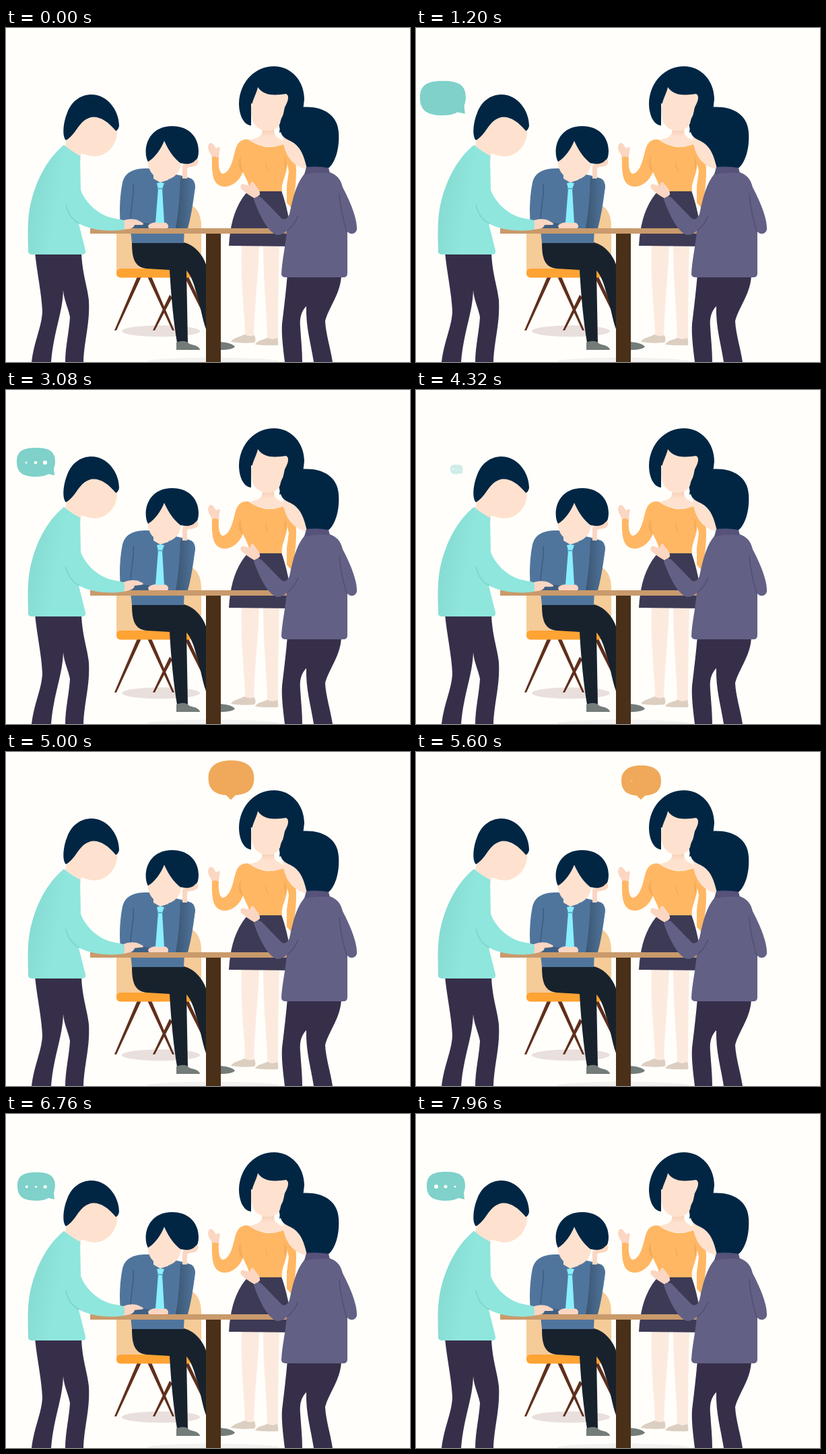
These frames come from a looping animation (600x497 px, 8000 ms). An HTML page:

```html
<!DOCTYPE html>
<html lang="en">
<head>
<meta charset="utf-8">
<title>Team discussion</title>
<style>
  html, body { margin: 0; width: 100%; height: 100%; overflow: hidden; background: #fffefa; }
  svg { display: block; width: 100%; height: 100%; }
  .skin { fill: #fee2cf; }
  .palm { fill: #fbd6c2; }
  .hair { fill: #012644; }
  .pants { fill: #372f4a; }
  .dot { fill: #fffefa; }
</style>
</head>
<body>
<svg viewBox="0 0 600 497">
  <defs>
    <linearGradient id="mint" x1="0" x2="1" y1=".3" y2=".5">
      <stop offset="0" stop-color="#84d9d0"/><stop offset=".35" stop-color="#8fe6dd"/>
    </linearGradient>
    <linearGradient id="sleeve">
      <stop offset="0" stop-color="#3b5672"/><stop offset="1" stop-color="#50759d"/>
    </linearGradient>
    <linearGradient id="neck" x2="0" y2="1">
      <stop offset="0" stop-color="#f6cdb5"/><stop offset="1" stop-color="#fee2cf"/>
    </linearGradient>
  </defs>

  <ellipse cx="230" cy="451" rx="58" ry="8.5" fill="#e9dfdc"/>
  <ellipse cx="308" cy="496" rx="98" ry="5.5" fill="#f3f2f0"/>

  <g id="woman">
    <path fill="#fdeadf" d="M350 320H376C375 365 370 400 368 460H355C355 425 348 385 350 320ZM382 320H406C405 370 404 403 404 464H388C388 430 382 380 382 320Z"/>
    <path fill="#dccfc1" d="M334 467C338 460 346 461 354 456C360 459 365 459 369 457Q372 465 369 468Q350 470 334 467ZM370 471C374 464 381 465 388 461C394 464 400 463 403 461Q405 468 404 472Q386 473 370 471Z"/>
    <path fill="#3d3a55" d="M360 242H409C416 262 422 285 425 325L331 324C333 290 341 262 360 242Z"/>
    <path fill="#ffb764" d="M412 176C426 182 431 195 431 211C431 235 428 255 424 268L417 260V235L420 213Z"/>
    <path class="palm" d="M306 194C306 188 300 185 300 177C301 171 304 169 308 173L312 179L316 177Q319 178 317 183L316 194Z"/>
    <path fill="#ffb764" d="M360 166Q388 185 411 172Q418 180 418 200C417 220 408 230 410 243H362C362 232 356 224 352 214C346 229 334 237 323 236C309 234 305 222 306 192Q311 190 316 193C315 206 317 216 322 217C334 214 337 195 341 180Q346 164 360 166Z"/>
    <path fill="#eba052" opacity=".5" d="M349 190C343 200 345 210 352 215C350 205 348 199 349 190ZM386 195C384 205 386 211 391 213C387 207 386 203 386 195ZM414 190Q412 202 415 212Q418 202 414 190Z"/>
    <path class="skin" d="M361 167C372 163 380 164 381 150H398C398 162 403 163 412 168Q413 172 410 174Q387 182 361 167Z"/>
    <path fill="url(#neck)" d="M381 150H398V159Q389 165 380 160Z"/>
    <path class="hair" d="M364 145C352 144 346 128 346 112C347 80 370 57 398 57C424 57 443 79 443 106L440 132L406 156Q412 132 364 112Z"/>
    <path class="skin" d="M364 120C366 106 372 98 374 88C383 102 401 100 416 98C422 101 418 111 414 118C410 136 408 152 389 153C373 153 363 141 364 120Z"/>
  </g>

  <g id="seated">
    <path fill="#f5cb98" d="M164 300H190L200 264H276Q290 272 290 296V362H164Z"/>
    <path fill="#5f2f1c" d="M195 370H201L164 450H161ZM210 370H216L250 450H247ZM243 397L247 401L221 450H218ZM265 370H271L304 440H300Z"/>
    <rect x="164" y="358" width="114" height="13.5" rx="6" fill="#ffa333"/>
    <path fill="#18222d" d="M187 319H264C281 323 293 339 297 352V448C291 432 288 408 282 392C278 376 273 366 268 361L270 468H254C249 438 245 398 243 360L209 358C191 356 187 343 187 319Z"/>
    <path fill="#747c79" d="M253 479V468Q261 464 269 467C273 473 284 470 288 478V479ZM318 479V467C325 468 334 468 340 474Q337 479 318 479Z"/>
    <path fill="#50759d" d="M214 209C192 208 177 213 173 230C169 250 168 272 170 292L185 301L187 320H264L265 298C272 298 277 260 281 236Q280 224 272 223L262 220Z"/>
    <path fill="none" stroke="#3d5d80" stroke-width="1.5" d="M189 232C191 250 184 270 185 291"/>
    <path fill="url(#sleeve)" d="M259 223Q280 221 281 236C278 260 275 280 270 298H252C256 275 258 248 259 223Z"/>
    <path fill="#3f6082" d="M185 290Q200 288 213 291V299H186Z"/>
    <path fill="#50759d" d="M216 223L229 231L242 223L240 236L229 230L218 235Z"/>
    <path class="palm" d="M211 294C216 288 228 288 238 290Q243 294 240 298H212Z"/>
    <path fill="#8aeffd" d="M224 231Q229 229 235 231L232 239L235 290H222L226 239Z"/>
    <path fill="#50b8d0" d="M225 238H233V240H225Z"/>
    <path class="palm" d="M262 224V206L266 197Q276 193 284 195Q287 198 284 203C280 208 272 205 269 209V224Z"/>
    <path class="skin" d="M219 216H246L241 226L229 230L219 224Z"/>
    <ellipse class="skin" cx="235.5" cy="198" rx="25" ry="28"/>
    <path class="hair" d="M211 199C203 186 207 146 247 146C274 146 286 165 286 183Q286 195 281 197C276 203 267 203 259 201C248 193 240 179 235 168C230 180 222 192 211 199Z"/>
  </g>

  <g id="table">
    <path fill="#c99a6b" d="M125 298H421V306H125Z"/>
    <path fill="#4a3018" d="M297 306H319V497H297Z"/>
  </g>

  <g id="right-man">
    <path class="pants" d="M418 366H498C498 394 480 414 474 436C475 456 482 476 485 497H457C453 470 445 445 446 414C438 422 436 432 437 445C438 462 440 480 440 497H414C411 472 409 455 410 440C413 415 416 390 418 366Z"/>
    <path class="palm" d="M370 254C361 249 354 244 349 239Q347 234 351 232L362 235Q363 228 367 229C371 236 378 240 377 248Z"/>
    <path fill="#636085" d="M446 214C432 228 426 252 421 277Q416 288 409 283L379 252Q371 249 368 255C376 278 390 306 403 308Q412 308 417 301C415 326 410 345 409 366Q409 371 416 371H501Q507 371 507 365V303C512 308 519 307 521 300C522 284 511 258 500 237C497 224 490 217 478 214Z"/>
    <path fill="none" stroke="#524e74" stroke-width="1.5" d="M495 246C496 265 501 286 506 303M417 302Q428 294 434 279"/>
    <path class="skin" d="M411 160C411 185 424 207 447 210L455 175Z"/>
    <path class="hair" d="M407 150C406 135 412 122 430 119C462 113 492 124 494 155C496 180 488 203 478 209H447C444 198 441 183 431 174C422 165 409 167 407 150Z"/>
    <path fill="#56527a" d="M446 207Q462 205 479 208L481 216Q461 214 443 218Z"/>
  </g>

  <g id="left-man">
    <path class="pants" d="M43 334H112C113 365 121 385 123 405C125 440 116 465 115 497H88C88 475 94 450 95 430C92 415 86 405 85 390C84 425 71 450 67 497H38C42 465 53 445 54 422C53 395 46 365 43 334Z"/>
    <path class="skin" d="M90 166L106 148C116 130 134 128 148 136L165 150C167 173 150 191 132 191C121 191 114 185 111 188V196L88 176Z"/>
    <path class="hair" d="M89 167C83 161 85 140 91 126C98 107 113 99 127 99C150 99 168 122 168 146Q166 153 163 153C150 137 135 129 123 134C107 140 104 159 89 167Z"/>
    <g id="hand">
      <path class="palm" d="M173 287C182 283 190 284 196 286L203 290Q206 293 201 293L191 293Q190 298 182 299L173 300Z"/>
    </g>
    <path fill="url(#mint)" d="M86 174Q98 184 110 190L111 241C117 258 136 279 160 283L175 286Q177 293 175 300C150 304 125 300 108 291L118 331Q119 337 112 337H38Q32 337 33 330C32 300 32 275 39 252C48 220 64 192 86 174Z"/>
    <path fill="none" stroke="#7dd3ca" stroke-width="1.5" d="M89 263C92 277 99 286 109 291"/>
  </g>

  <g id="teal">
    <path fill="#7fd1ca" d="M44.5 86C64 86 73 91 73 107Q73 112 71 117L72 127L63 125Q56 129 44.5 129C25 129 16 123 16 107C16 91 25 86 44.5 86Z"/>
  </g>
  <g id="amber">
    <path fill="#f0a95a" d="M334.5 20C354 20 364 28 364 43C364 57 356 64 340 65L334 71L328 65C313 64 305 57 305 43C305 28 315 20 334.5 20Z"/>
  </g>
</svg>
<script>
const LOOP = 8000, STEP = 40, BEAT = 880, TALK = 1760;
const byId = id => document.getElementById(id);
const clamp = x => Math.min(1, Math.max(0, x));
const ramp = (t, from, to) => clamp((t - from) / (to - from));
const smooth = x => x * x * (3 - 2 * x);
const wave = (t, shift = 0) => Math.cos(2 * Math.PI * ((t - TALK) / BEAT - shift));

// Grows past full size, then settles.
const pop = t => t < 1120
  ? 1.3 * Math.sin(ramp(t, 840, 1120) * Math.PI / 2)
  : 1.3 - .3 * smooth(ramp(t, 1120, 1320));

const bubbles = [
  { el: byId('teal'), anchor: [68, 123.5], dots: [30, 44, 58], y: 108, talk: TALK,
    size: t => t < 6380 ? pop(t) * (1 - ramp(t, 4040, 4460)) : 1 - (1 - ramp(t, 6380, 6820)) ** 2,
    alpha: t => t < 6380 ? 1 - ramp(t, 4080, 4460) : ramp(t, 6380, 6720) },
  { el: byId('amber'), anchor: [334.5, 70], dots: [320.5, 334, 347.5], y: 43, talk: 5560,
    size: t => pop(t - 3780) * (1 - ramp(t, 6260, 6680)),
    alpha: t => 1 - ramp(t, 6300, 6680) }
];

for (const b of bubbles) {
  b.circles = b.dots.map(x => {
    const c = document.createElementNS('http://www.w3.org/2000/svg', 'circle');
    c.setAttribute('class', 'dot');
    c.setAttribute('cx', x);
    c.setAttribute('cy', b.y);
    return b.el.appendChild(c);
  });
}

function draw(t) {
  for (const b of bubbles) {
    const [x, y] = b.anchor;
    b.el.setAttribute('transform', `translate(${x} ${y}) scale(${b.size(t)}) translate(${-x} ${-y})`);
    b.el.setAttribute('opacity', b.alpha(t));
    b.circles.forEach((c, i) => {
      const grow = ramp(t, b.talk - STEP + i * 80, b.talk + 160 + i * 80);
      c.setAttribute('r', grow * (2.3 + .8 * wave(t, i / 4)));
    });
  }
  const lift = t < TALK ? 0 : (1 - wave(t)) / 2;
  byId('hand').setAttribute('transform', `rotate(${-7 * lift} 176 293)`);
}

function tick() {
  draw(Math.floor(performance.now() % LOOP / STEP) * STEP);
  requestAnimationFrame(tick);
}
tick();
</script>
</body>
</html>
```
